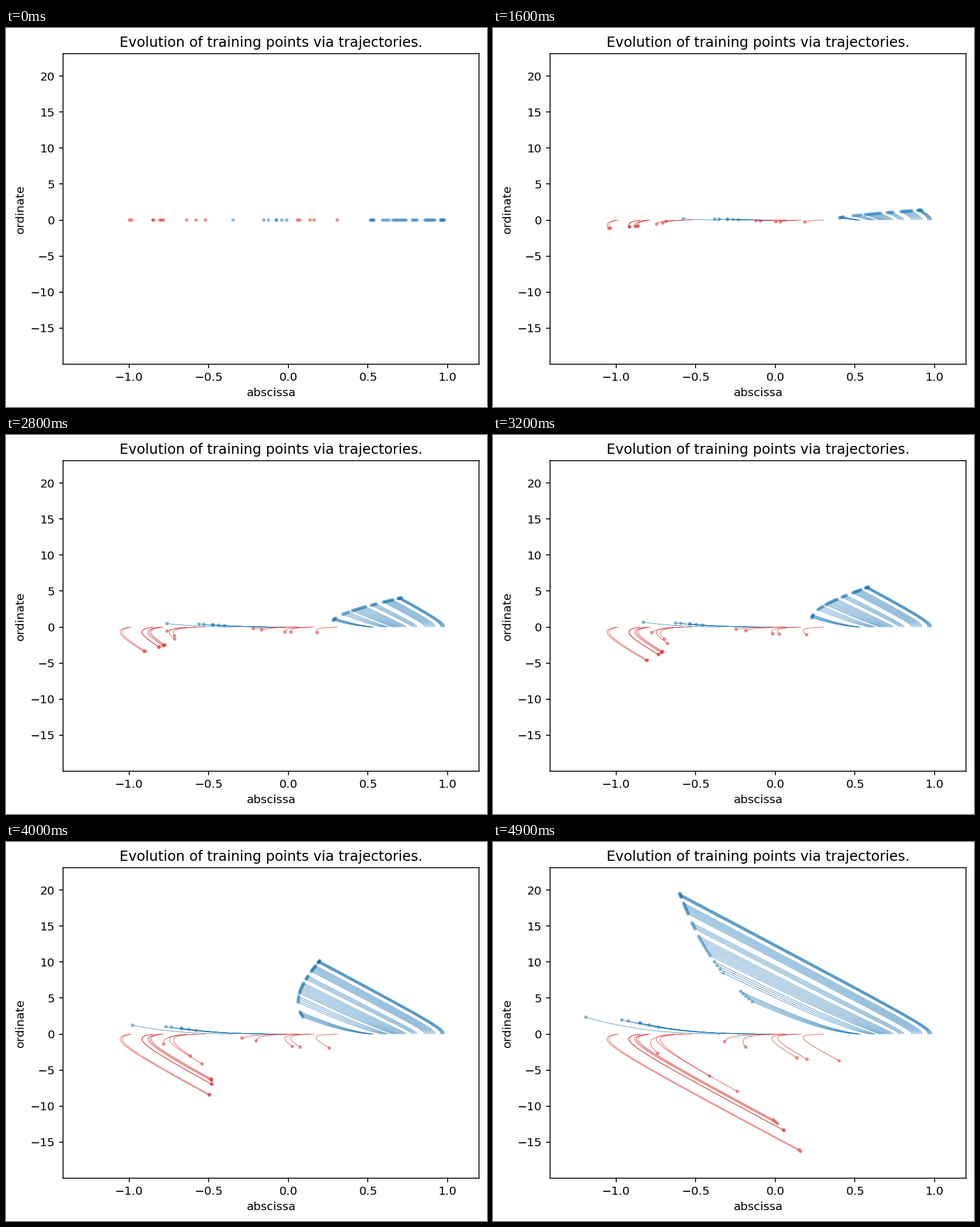
A matplotlib script that plays this animation: 843x664 px, repeating every 5 s.

```python
import numpy as np
import matplotlib.pyplot as plt
from matplotlib.animation import FuncAnimation
from matplotlib.collections import LineCollection

WIDTH, HEIGHT, DPI = 843, 664, 147
FRAMES, INTERVAL, STEPS = 50, 100, 4
LAST = FRAMES - 1
LEFT, BOTTOM = 100, 588.6
AXES_W, AXES_H = 0.775 * 6.4 * DPI, 0.77 * 4.8 * DPI
XLIM, YLIM = (-1.416, 1.198), (-19.98, 23.09)
RED, BLUE = "tab:red", "tab:blue"

GROWTH, SETTLING = 0.069, 0.06   # rates per frame
SLANT = 1.9                      # leftward run per unit of rise


def fade(distance, length):
    return np.exp(-distance / length)


def spread(*runs):
    """Start positions: evenly spaced runs of (first, last, count)."""
    return np.concatenate([np.linspace(*run) for run in runs])


def left_settle(drift):
    """Settling share that gives every left-hand point the same first speed."""
    return -96 - drift / 2


# Each rule gives the final rise, the final drift and its settling share,
# in stage pixels, from the distance to the border where the rise is zero.
def far_left(x):
    d = 355 - x
    drift = -68 - 75 * fade(d, 20)
    return -13 * d ** 0.56, drift, left_settle(drift)


def mid_left(x):
    d = 510 - x
    drift = np.full_like(x, -179)
    return 31 * (1 - fade(d, 36)), drift, left_settle(drift)


def mid_right(x):
    d = x - 507
    drift = -62 - 88 * fade(d, 16)
    return -47 * (1 - fade(d, 12)), drift, left_settle(drift)


def far_right(x):
    d = x - 628
    drift = -88 + 1.16 * d - 0.0024 * d ** 2
    return 15.1 * d ** 0.565, drift, 27 * (1 - fade(d, 60))


GROUPS = [
    (RED, far_left, spread((216.5, 220, 2), (257.5, 258.5, 2),
                           (269.5, 276, 3), (316.5, 349.5, 3))),
    (BLUE, mid_left, spread((398, 398, 1), (452, 460, 2),
                            (474, 474, 2), (483.5, 492, 2))),
    (RED, mid_right, spread((511, 515, 2), (533, 540, 2), (580.5, 580.5, 1))),
    (BLUE, far_right, spread((638.5, 645, 5), (660, 671, 4), (678, 701.5, 9),
                             (712, 720.5, 4), (734, 751.5, 8),
                             (761.5, 768, 6))),
]


def to_data(x, rise):
    x_unit = AXES_W / (XLIM[1] - XLIM[0])
    y_unit = AXES_H / (YLIM[1] - YLIM[0])
    return (x - LEFT) / x_unit + XLIM[0], rise / y_unit


def trajectories(rule, starts, times):
    """Paths of shape (points, times, 2) in data coordinates."""
    end_rise, end_drift, settle = (v[:, None] for v in rule(starts))
    rise = end_rise * np.expm1(GROWTH * times) / np.expm1(GROWTH * LAST)
    settled = 1 - np.exp(-SETTLING * times)
    speed = (end_drift - settle * settled[-1]) / LAST
    x = starts[:, None] + speed * times + settle * settled - SLANT * rise
    return np.stack(to_data(x, rise), axis=-1)


times = np.linspace(0, LAST, LAST * STEPS + 1)
paths = np.concatenate([trajectories(rule, starts, times)
                        for _, rule, starts in GROUPS])
colors = [color for color, _, starts in GROUPS for _ in starts]

fig = plt.figure(figsize=(WIDTH / DPI, HEIGHT / DPI), dpi=DPI)
ax = fig.add_axes([LEFT / WIDTH, 1 - BOTTOM / HEIGHT,
                   AXES_W / WIDTH, AXES_H / HEIGHT])
ax.set(xlim=XLIM, ylim=YLIM, xlabel="abscissa", ylabel="ordinate",
       title="Evolution of training points via trajectories.")
ax.set_xticks(np.arange(-1, 1.1, 0.5))
ax.set_yticks(np.arange(-15, 21, 5))

trails = LineCollection([], colors=colors, linewidths=0.35, zorder=2)
ax.add_collection(trails, autolim=False)
dots = ax.scatter(*paths[:, 0].T, s=9, c=colors, alpha=0.5,
                  linewidths=0, zorder=3)


def update(frame):
    now = frame * STEPS
    trails.set_segments(list(paths[:, :now + 1]) if frame else [])
    dots.set_offsets(paths[:, now])
    return trails, dots


anim = FuncAnimation(fig, update, frames=FRAMES, interval=INTERVAL,
                     init_func=lambda: update(0), repeat=True, repeat_delay=0)
plt.show()
```
